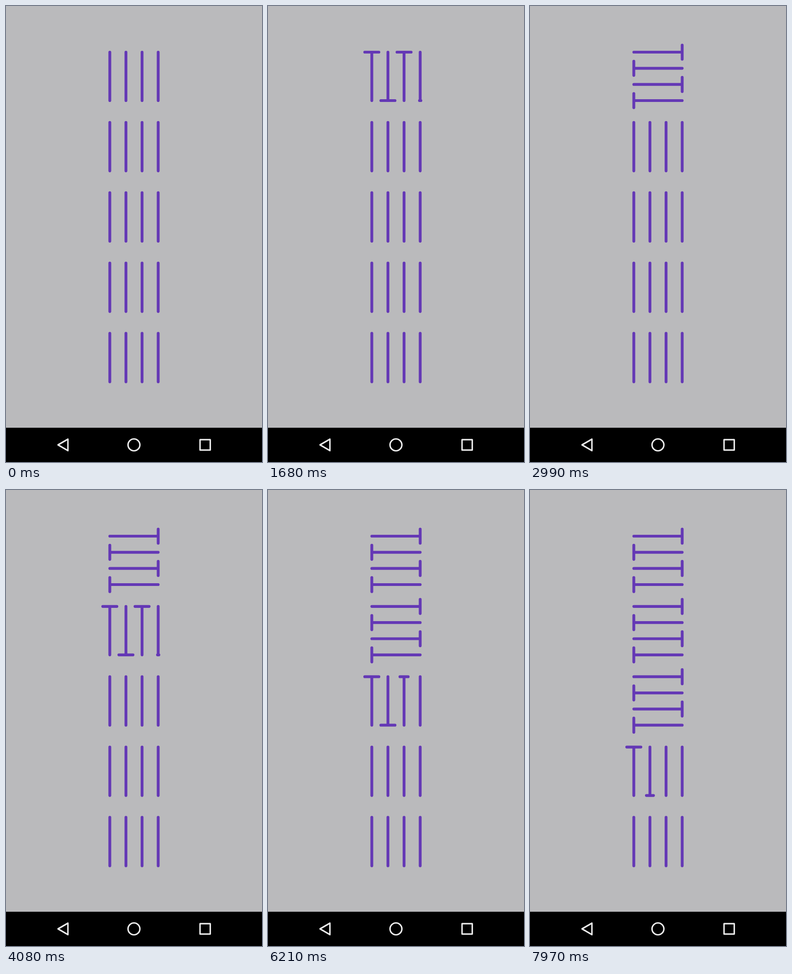
Animation, 561 px wide and 998 px high, one loop 8000 ms. Source, as an HTML page:

```html
<!DOCTYPE html>
<html lang="en">
<head>
<meta charset="utf-8">
<title>Turning bars</title>
<style>
html, body { margin: 0; width: 100%; height: 100%; overflow: hidden; background: #bababc; }
svg { display: block; }
#bars { fill: none; stroke: #6438b5; stroke-width: 6.2; stroke-linecap: round; }
#nav { fill: none; stroke: #ececec; stroke-width: 3.2; stroke-linejoin: round; }
</style>
</head>
<body>
<svg width="561" height="998" viewBox="0 0 561 998">
  <rect width="561" height="998" fill="#bababc"/>
  <g id="bars"></g>
  <rect y="923" width="561" height="75" fill="#000"/>
  <g id="nav">
    <path d="M114 960.5L135.7 948V973.2Z"/>
    <circle cx="280.4" cy="960.5" r="13"/>
    <rect x="425.2" y="949.2" width="22.4" height="22.6"/>
  </g>
</svg>
<script>
const LOOP = 8000;
const CAP_MS = 337;          // growth time of one end cap
const TURN_MS = 712;         // quarter turn after four caps
const HALF = 53;             // half the side of a group
const CAP = 15.5;            // half the length of a full cap
const CENTER = { x: 280.5, y: 154, step: 153.85 };
const STARTS = [637, 3037, 5341, 7465, Infinity];

const clamp = v => Math.min(1, Math.max(0, v));
const bars = document.getElementById('bars');
const groups = STARTS.map(start => {
  const path = document.createElementNS('http://www.w3.org/2000/svg', 'path');
  bars.append(path);
  return { start, path };
});

function shape(t) {
  let d = '';
  for (let col = 0; col < 4; col++) {
    const x = -HALF + col * HALF * 2 / 3;
    const grow = CAP * clamp(t / CAP_MS - col);
    d += `M${x} ${-HALF}V${HALF}`;
    if (grow > 0) d += `M${x - grow} ${col % 2 ? HALF : -HALF}h${2 * grow}`;
  }
  return d;
}

function draw(now) {
  const time = now % LOOP;
  groups.forEach(({ start, path }, i) => {
    const t = time - start;
    const angle = 90 * clamp((t - 4 * CAP_MS) / TURN_MS);
    const y = CENTER.y + i * CENTER.step;
    path.setAttribute('d', shape(t));
    path.setAttribute('transform', `translate(${CENTER.x} ${y}) rotate(${angle})`);
  });
}

const begin = performance.now();
function tick() {
  draw(performance.now() - begin);
  requestAnimationFrame(tick);
}
tick();
</script>
</body>
</html>
```
